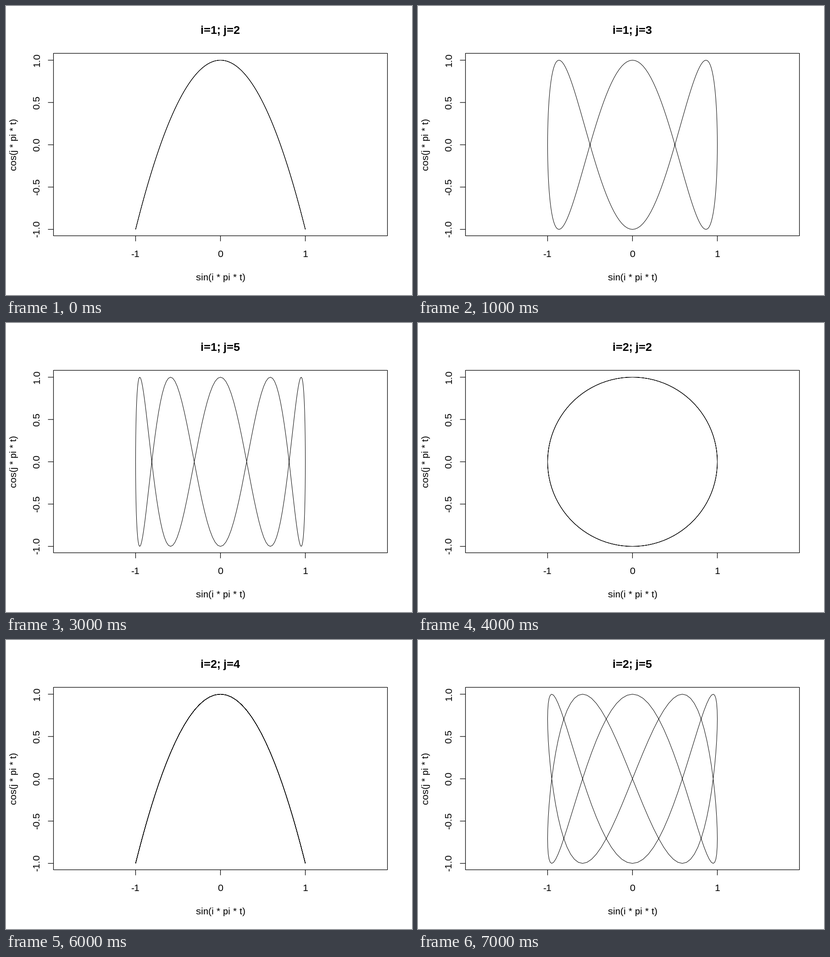
Animation, 885 px wide and 632 px high, one loop 8000 ms. Source, as a matplotlib script:

```python
import numpy as np
import matplotlib.pyplot as plt
from matplotlib.animation import FuncAnimation
from matplotlib.patches import Rectangle

W, H = 885, 632
CX, CY, UNIT = 467.5, 303.5, 185   # centre of the plot and pixels per data unit
LEFT, TOP, RIGHT, BOTTOM = 103.5, 103.5, 831.5, 502.5
TICK = 12
FRAME_LW, CURVE_LW = 1.25, 1

# Full hinting gives crisp, dark stems at these small sizes.
plt.rcParams.update({
    "font.family": "Liberation Sans",
    "text.hinting": "native",
    "text.hinting_factor": 1,
})

# At 72 dpi one point is one pixel, so all sizes below are pixels.
fig = plt.figure(figsize=(W / 72, H / 72), dpi=72, facecolor="white")
ax = fig.add_axes([0, 0, 1, 1])
ax.set_xlim(0, W)
ax.set_ylim(H, 0)
ax.axis("off")


def line(xs, ys, width=FRAME_LW):
    return ax.plot(xs, ys, color="black", lw=width, snap=False,
                   solid_capstyle="butt", solid_joinstyle="round")[0]


def label(x, y, text, size=21, **kw):
    return ax.text(x, y, text, fontsize=size, color="black",
                   ha="center", va="baseline", **kw)


def side_label(x, y, text):
    return label(x, y, text, rotation=90, rotation_mode="anchor")


ax.add_patch(Rectangle((LEFT, TOP), RIGHT - LEFT, BOTTOM - TOP, fill=False,
                       ec="black", lw=FRAME_LW, snap=False))

for v in (-1, 0, 1):
    x = CX + UNIT * v
    line([x, x], [BOTTOM, BOTTOM + TICK])
    label(x - 0.5, 549, str(v))

for v in (-1, -0.5, 0, 0.5, 1):
    y = CY - UNIT * v
    line([LEFT - TICK, LEFT], [y, y])
    side_label(73, y - 0.5, f"{v:.1f}")

label(CX, 600, "sin(i * pi * t)")
side_label(23, CY, "cos(j * pi * t)")

title = label(CX, 61, "", 25, weight="bold")
curve = line([], [], CURVE_LW)
t = np.linspace(0, 2, 201)


def update(n):
    i, j = 1 + n // 4, 2 + n % 4
    title.set_text(f"i={i}; j={j}")
    curve.set_data(CX + UNIT * np.sin(i * np.pi * t),
                   CY - UNIT * np.cos(j * np.pi * t))
    return title, curve


anim = FuncAnimation(fig, update, frames=8, interval=1000,
                     repeat=True, repeat_delay=0)
plt.show()
```
